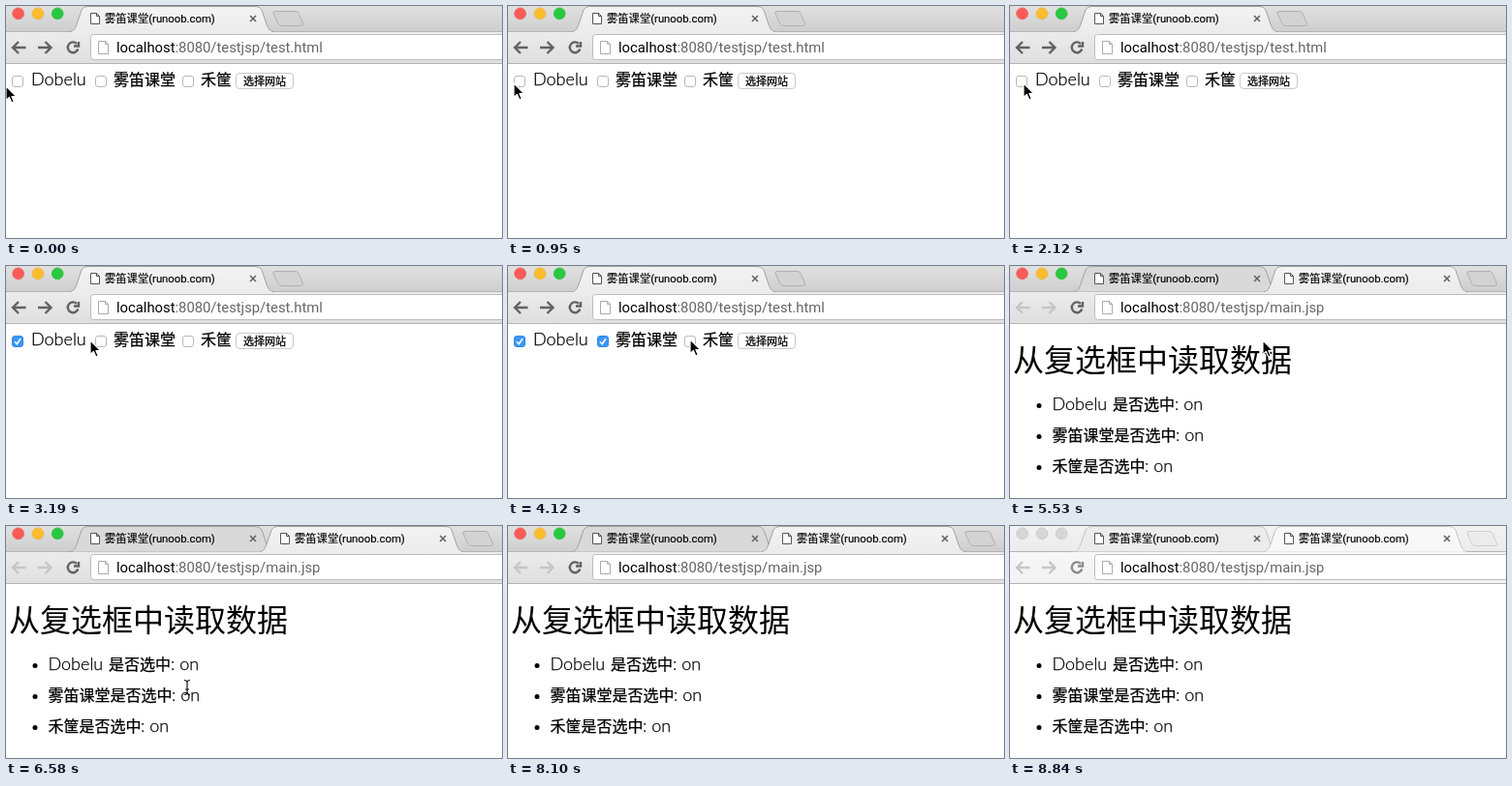
Animation, 512 px wide and 240 px high, one loop 8940 ms. Source, as an HTML page:

```html
<!DOCTYPE html>
<html lang="zh">
<head>
<meta charset="utf-8">
<title>Checkbox demo</title>
<style>
  html, body { margin: 0; width: 100%; height: 100%; overflow: hidden; background: #fff; }
  svg { display: block; }
  text { font: 16px 'Noto Sans CJK SC', 'Noto Sans CJK', sans-serif; white-space: pre; stroke: #000; stroke-width: .25; }
  .latin { font: 300 18px Lato, sans-serif; }
  .title { font: 11.3px Roboto, 'Noto Sans CJK SC', 'Noto Sans CJK', sans-serif; stroke-width: .15; }
  .url { font: 14.8px Roboto, sans-serif; fill: #666; stroke: none; }
  .url tspan { fill: #000; }
  .label { font-size: 11px; }
  .heading { font-size: 32px; stroke: none; }
  .icon { fill: #fff; stroke: #555; }
  .nav, .reload { fill: none; stroke: #626262; stroke-width: 2.4; }
  .tab { fill: url(#front); stroke: #a2a2a2; }
  .close { stroke: #606060; stroke-width: 1.5; }
  .box { fill: #fff; stroke: #b8b8b8; }
  .tick { fill: none; stroke: #fff; stroke-width: 1.7; visibility: hidden; }
  .pressed .box { fill: #d8d8d8; stroke: #999; }
  .checked .box { fill: #3b97f8; stroke: #2f86e6; }
  .checked .tick { visibility: visible; }
  .button { fill: #fff; stroke: #c9c9c9; }
  .down .button { fill: url(#blue); stroke: #1666dc; }
  .plus { fill: #d3d3d3; stroke: #b0b0b0; }
  .result { display: none; }
  .opened .result { display: inline; }
  .opened .form { display: none; }
  .opened .first .tab { fill: #d9d9d9; }
  .opened .nav { stroke: #c6c6c6; }
  .veil { display: none; fill: #fff; opacity: .6; }
  .inactive .veil { display: inline; }
  .inactive .lights circle { fill: #d6d6d6; stroke: #c4c4c4; }
  .inactive .reload { stroke: #8c8c8c; }
  .inactive .first .tab { fill: #ececec; }
  .inactive .tab { fill: #f8f8f8; stroke: #c4c4c4; }
  .inactive .plus { fill: #ececec; stroke: #cfcfcf; }
</style>
</head>
<body>
<svg id="stage" width="512" height="240" viewBox="0 0 512 240">
  <defs>
    <linearGradient id="strip" x2="0" y2="1"><stop stop-color="#e0e0e0"/><stop offset="1" stop-color="#cecece"/></linearGradient>
    <linearGradient id="front" x2="0" y2="1"><stop stop-color="#f3f3f3"/><stop offset="1" stop-color="#ececec"/></linearGradient>
    <linearGradient id="bar" x2="0" y2="1"><stop stop-color="#ececec"/><stop offset="1" stop-color="#dfdfdf"/></linearGradient>
    <linearGradient id="blue" x2="0" y2="1"><stop stop-color="#5ba2fb"/><stop offset="1" stop-color="#0b60e8"/></linearGradient>
    <g id="tabShape">
      <path class="tab" d="M66 26.5C70 26 71 24 73 19L78 4Q80 .5 84 .5H258Q262 .5 264 4L269 19C271 24 272 26 276 26.5"/>
      <path class="icon" d="M87.5 7.5H93.5L96.5 10.5V18.5H87.5ZM93.5 7.5V10.5H96.5"/>
      <text class="title" x="102" y="17">雾笛课堂(runoob.com)</text>
      <path class="close" d="M252 10L258 16M258 10L252 16"/>
    </g>
    <path id="plus" d="M278 5.5H299Q301 5.5 302 7.5L306.5 18Q307 20.5 304 20.5H285Q282 20.5 281 18.5L276 8Q275 5.5 278 5.5Z"/>
  </defs>

  <rect width="512" height="240" fill="#fff"/>
  <rect width="512" height="27" fill="url(#strip)"/>
  <rect class="veil" width="512" height="26"/>
  <path d="M0 26.5H512" stroke="#b4b4b4"/>
  <g class="lights" stroke-width=".7">
    <circle cx="12.6" cy="7.8" r="5.9" fill="#fc5b57" stroke="#f0544f"/>
    <circle cx="33" cy="7.8" r="5.9" fill="#fdbc2e" stroke="#f0b030"/>
    <circle cx="53.2" cy="7.8" r="5.9" fill="#28c840" stroke="#27bc3c"/>
  </g>
  <use href="#plus" class="plus form"/>
  <use href="#plus" class="plus result" x="196"/>
  <g id="firstTab" class="first"></g>
  <g id="secondTab" class="result" transform="translate(196)"></g>
  <rect y="27" width="512" height="32" fill="url(#bar)"/>
  <rect class="veil" y="27" width="512" height="32"/>
  <path class="form" d="M68 26.5H274" stroke="#ececec"/>
  <path class="result" d="M264 26.5H470" stroke="#ececec"/>
  <path d="M0 59.5H512" stroke="#b4b4b4"/>
  <path class="nav" d="M20.5 43H7M13 37L7 43L13 49M33 43H46.5M40.5 37L46.5 43L40.5 49"/>
  <path class="reload" d="M73 39A5.4 5.4 0 1 0 74.3 44.5"/>
  <path class="reload" d="M75 37V41.5H70"/>
  <rect x="87.5" y="29.5" width="440" height="26" rx="3" fill="#fff" stroke="#bdbdbd"/>
  <path class="icon" style="stroke:#aaa" d="M95.5 36.5H102.5L105.5 39.5V49.5H95.5ZM102.5 36.5V39.5H105.5"/>
  <text class="url form" x="114" y="48"><tspan>localhost</tspan>:8080/testjsp/test.html</text>
  <text class="url result" x="114" y="48"><tspan>localhost</tspan>:8080/testjsp/main.jsp</text>

  <g class="form">
    <g id="boxes"></g>
    <text class="latin" x="26" y="82">Dobelu</text>
    <text x="111" y="82">雾笛课堂</text>
    <text x="201" y="82">禾筐</text>
    <g id="submit">
      <rect class="button" x="237.5" y="69.5" width="59" height="16" rx="3.5"/>
      <text class="label" x="245" y="82">选择网站</text>
    </g>
  </g>

  <g class="result">
    <text class="heading" x="3" y="109">从复选框中读取数据</text>
    <circle cx="30" cy="144.5" r="2.5"/>
    <circle cx="30" cy="176.5" r="2.5"/>
    <circle cx="30" cy="208.5" r="2.5"/>
    <text class="latin" x="43.5" y="149">Dobelu</text>
    <text x="106" y="149">是否选中</text>
    <text class="latin" x="170" y="149">: on</text>
    <text x="43.5" y="181">雾笛课堂是否选中</text>
    <text class="latin" x="171" y="181">: on</text>
    <text x="43.5" y="213">禾筐是否选中</text>
    <text class="latin" x="139" y="213">: on</text>
  </g>

  <g id="cursor">
    <path id="arrow" d="M0 0V14.5L3.4 11.5L5.8 17L8.2 16L5.9 10.6H10.5Z" stroke="#fff" stroke-width="1.2" stroke-linejoin="round"/>
    <path id="beam" d="M-3 -7.5Q0 -7.5 0 -5V5Q0 7.5 -3 7.5M3 -7.5Q0 -7.5 0 -5M0 5Q0 7.5 3 7.5M-2 2H2" fill="none" stroke="#111" stroke-width="1.2"/>
  </g>
</svg>
<script>
const LOOP = 8940, OPEN = 5420, INACTIVE = 8840;
const $ = id => document.getElementById(id);

for (const id of ['firstTab', 'secondTab']) {
  for (const part of $('tabShape').children) $(id).append(part.cloneNode(true));
}

const checks = [
  { x: 6, press: 2360, release: 2480 },
  { x: 92, press: 3420, release: 3540 },
  { x: 182, press: 4240, release: 4360 }
];
$('boxes').innerHTML = checks.map(({ x }) => `<g transform="translate(${x} 72)">
  <rect class="box" x=".5" y=".5" width="11" height="11" rx="2.5"/>
  <path class="tick" d="M3 6.3L5.2 8.7L9 3.2"/></g>`).join('');

// Pointer moves: first step, last step, number of steps, final x, final y
const moves = [
  [360, 480, 2, -1, 79],
  [720, 1070, 4, 12, 80],
  [2120, 2120, 1, 14, 80],
  [2840, 2950, 2, 76, 77],
  [3190, 3310, 2, 97, 77],
  [3650, 4000, 4, 187, 77],
  [4120, 4120, 1, 188, 76],
  [4470, 4940, 5, 258, 76],
  [5060, 5180, 2, 261, 77],
  [5770, 6350, 6, 189, 144],
  [6580, 6580, 1, 187, 167],
  [6700, 6700, 1, 187, 176],
  [6930, 7300, 4, 149, 211],
  [7520, 8100, 6, 470, 250]
];

function pointerAt(t) {
  let x = 0, y = 83;
  for (const [start, end, steps, toX, toY] of moves) {
    if (t < start) break;
    const gap = (end - start) / (steps - 1) || 1;
    const done = Math.min(steps, Math.floor((t - start) / gap + 0.01) + 1) / steps;
    x += (toX - x) * done;
    y += (toY - y) * done;
  }
  return [Math.round(x), Math.round(y)];
}

function draw(now) {
  const t = now % LOOP;
  $('stage').classList.toggle('opened', t >= OPEN);
  $('stage').classList.toggle('inactive', t >= INACTIVE);
  $('submit').classList.toggle('down', t >= 5060 && t < OPEN);
  checks.forEach(({ press, release }, i) => {
    const state = t >= release ? 'checked' : t >= press ? 'pressed' : '';
    $('boxes').children[i].setAttribute('class', state);
  });
  const overText = t >= 6350 && t < 7520;
  $('arrow').style.display = overText ? 'none' : '';
  $('beam').style.display = overText ? '' : 'none';
  $('cursor').setAttribute('transform', `translate(${pointerAt(t)})`);
  requestAnimationFrame(() => draw(performance.now()));
}
draw(0);
</script>
</body>
</html>
```
